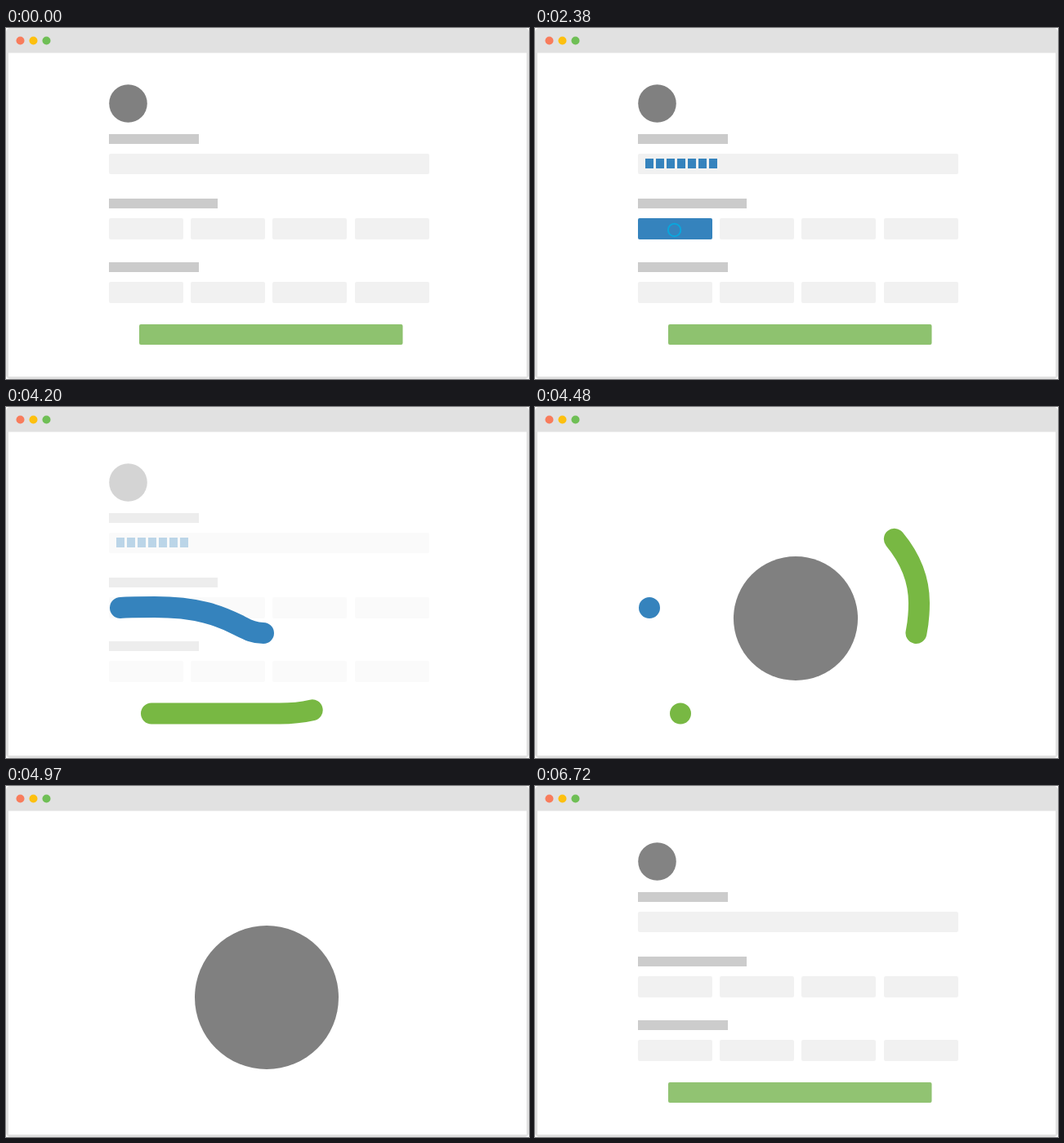
Write an HTML page that moves like this. It is 640x430 px and loops after 7700 ms.

```html
<!DOCTYPE html>
<html lang="en">
<head>
<meta charset="utf-8">
<title>Form</title>
<style>
  html, body { margin: 0; width: 100%; height: 100%; overflow: hidden; background: #fff; }
  svg { display: block; width: 640px; height: 430px; }
</style>
</head>
<body>
<svg id="stage" viewBox="0 0 640 430">
  <rect width="640" height="430" rx="5" fill="#e1e1e1"/>
  <rect x="3" y="30.5" width="634" height="396.5" fill="#fff"/>
  <circle cx="17.5" cy="15.5" r="5" fill="#f87c5c"/>
  <circle cx="33.5" cy="15.5" r="5" fill="#fdc00f"/>
  <circle cx="49.5" cy="15.5" r="5" fill="#6fbf55"/>
  <g id="form"><circle cx="149.5" cy="92.5" r="23.3" fill="#808080"/></g>
  <g id="picks"></g>
  <rect id="button" x="163" y="363" width="322.5" height="25" rx="2" fill="#8ec26f"/>
  <g fill="none" stroke-width="26" stroke-linecap="round">
    <path id="blue" pathLength="1" stroke="#3583bd"
      d="M140 246C145 245 165 245 182 245C235 245 262 256 284 267C296 273 303 277 315 277"/>
    <path id="green" pathLength="1" stroke="#78b843"
      d="M178 375.5H335C420 375.5 470 325 470 240C470 170 400 107 328 107"/>
  </g>
  <circle id="badge" cx="319" cy="259" r="88" fill="#808080"/>
  <circle id="ring" fill="none" stroke="#0aa6dd" stroke-width="2"/>
</svg>
<script>
const LOOP = 7700, STEP = 70;
const $ = id => document.getElementById(id);
const set = (el, attrs) => { for (const k in attrs) el.setAttribute(k, attrs[k]); };
const ramp = (t, from, to) => Math.min(1, Math.max(0, (t - from) / (to - from)));
const easeInOut = p => p < .5 ? 2 * p * p : 1 - 2 * (1 - p) ** 2;
const easeOut = p => 1 - (1 - p) ** 2;

function box(parent, x, y, width, height, fill, rx = 0) {
  const el = document.createElementNS('http://www.w3.org/2000/svg', 'rect');
  set(el, { x, y, width, height, fill, rx });
  return parent.appendChild(el);
}

const form = $('form'), picks = $('picks');
[[130, 110], [209, 133], [287, 110]].forEach(([y, w]) => box(form, 126, y, w, 12, '#cbcbcb'));
box(form, 126, 154, 392, 25, '#f1f1f1', 2);
for (const y of [233, 311])
  for (const x of [126, 226, 326, 427]) box(form, x, y, 91, 26, '#f1f1f1', 2);
const letters = Array.from({ length: 7 }, (_, i) => box(form, 135 + 13 * i, 160, 10, 12, '#3583bd'));
const choices = [[126, 233], [226, 311]].map(([x, y]) => box(picks, x, y, 91, 26, '#3583bd', 2));

// Pointer stops: start of the move, then where it clicks
const stops = [[0, 138.5, 166], [1470, 170, 247], [2350, 272.5, 323], [3300, 325, 377]];

function drawRing(t) {
  let x = -15, y = 112, r = 7.7;
  for (const [start, tx, ty] of stops) {
    const p = easeInOut(ramp(t, start, start + 560));
    x += (tx - x) * p;
    y += (ty - y) * p;
    r += 6.3 * Math.sin(Math.PI * ramp(t, start + 560, start + 880));
  }
  set($('ring'), { cx: x, cy: y, r, opacity: t < 4130 ? 1 : 0 });
}

function drawStroke(id, tail, head) {
  set($(id), {
    'stroke-dasharray': `0 ${tail} ${head - tail} 2`,
    visibility: head - tail > .001 ? 'visible' : 'hidden'
  });
}

function render(time) {
  const t = Math.floor(time / STEP) * STEP;
  const back = ramp(t, 6365, 6730);
  const fresh = t >= 6370;
  drawRing(t);

  letters.forEach((el, i) => set(el, { opacity: t >= 910 + STEP * i && !fresh ? 1 : 0 }));
  choices.forEach((el, i) => set(el, { opacity: t >= stops[i + 1][0] + 630 ? 1 : 0 }));
  const swap = 1 - ramp(t, 3990, 4190);
  set(picks, { opacity: swap });
  set($('button'), { opacity: fresh ? back : swap });
  set(form, { opacity: fresh ? back : 1 - ramp(t, 3920, 4340) });

  drawStroke('blue', easeInOut(ramp(t, 4200, 4620)), ramp(t, 3990, 4200));
  drawStroke('green', easeOut(ramp(t, 4220, 4970)), ramp(t, 3990, 4617));
  set($('badge'), { r: 88 * easeOut(ramp(t, 4240, 4620)), opacity: 1 - ramp(t, 6365, 6720) });
}

const begin = performance.now();
function tick() {
  render((performance.now() - begin) % LOOP);
  requestAnimationFrame(tick);
}
tick();
</script>
</body>
</html>
```
